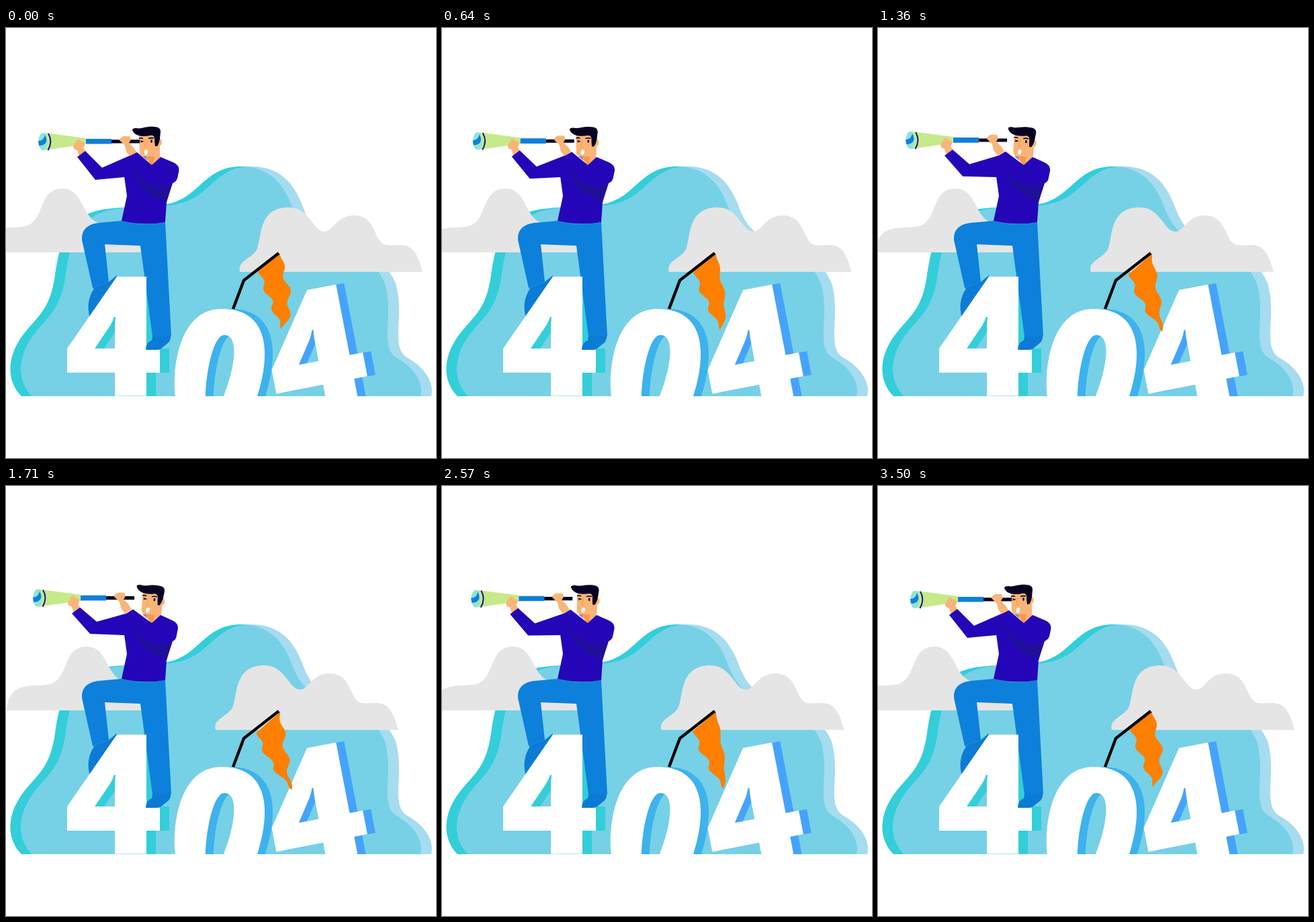
An HTML page with a canvas for the animation above (3570 ms loop, 640 by 640 pixels).

```html
<!DOCTYPE html>
<html lang="en">
<head>
<meta charset="utf-8">
<title>404</title>
<style>
  html, body { margin: 0; height: 100%; overflow: hidden; background: #fff; }
  canvas { display: block; }
</style>
</head>
<body>
<canvas id="stage" width="640" height="640"></canvas>
<script>
const ctx = document.getElementById('stage').getContext('2d');
const LOOP = 3570, STEPS = 50, GROUND = 548;
const C = {
  teal: '#33ced9', sky: '#76d1e6', pale: '#a6dcf0', cloud: '#e5e5e5',
  jeans: '#0d80db', shoe: '#0c7bd5', shirt: '#2406b8', shade: '#1f0f9b',
  skin: '#f9b577', neck: '#f9974d', hair: '#080124', flag: '#ff7f00',
  zero: '#3db2ec', four: '#45a3fb', lens: '#8be5dc', tube: '#c6ea89'
};

const shape = d => new Path2D(d);
const blob = shape('M23 548C0 525 0 487 29 452C52 425 66 415 73 368C80 325 86 280 145 270' +
  'C185 264 225 269 254 258C290 244 300 206 350 206C392 206 414 232 427 269' +
  'C455 345 535 310 564 380C578 430 555 475 582 491C608 506 622 528 617 548Z');
const leftCloud = shape('M-35 334C-32 285 10 302 32 294C58 284 48 239 84 239' +
  'C118 239 112 290 145 291C180 294 200 305 201 334Z');
const rightCloud = shape('M348 363C344 345 368 343 374 328C381 309 376 267 421 267C452 267 457 303 474 303' +
  'C487 303 491 279 518 279C552 279 547 320 566 323C588 326 607 310 620 363Z');

// The digit 4, measured from its top left corner
const four = shape('M0 0H44V107H64V143H44V177.5H-3V143H-74V107ZM-33 107H-3V73L-2 60H-4Q-7 68 -10 73Z');
const zero = shape('M252 548C247 505 258 418 321 418C395 418 393 490 374 548Z' +
  'M297 548C298 510 309 457 325 457C346 457 343 500 324 548Z');

const jeans = shape('M172 287L138 290C119 292 110 303 114 320L129 387L153 378L147 322L200 324' +
  'L218 459H246L237 289Q205 296 172 287Z');
const backShoe = shape('M129 387L153 378L165 368L160 400L125 432Q118 407 131 388Z');
const frontShoe = shape('M218 459H245Q245 465 242 468L231 477Q229 479 225 479H208Q208 468 217 465Z');
const hair = shape('M188 152Q188 149 194 149C201 151 208 146 220 147Q230 147 230 154L229 165' +
  'Q228 172 225 176H222Q221 170 221 164Q220 159 215 160C205 162 192 162 188 152Z');
const face = shape('M198 160H229V188Q229 191 225 191H205Q199 191 199 185Z');
const nearHand = shape('M100 176L105 167Q109 164 111 168L117 171Q118 175 115 178L118 183L109 192L106 182L101 180Z');
const farHand = shape('M168 166L174 161H184L186 166L183 171L190 178L195 186L185 192L179 184L177 175Z');

function fill(path, color) {
  ctx.fillStyle = color;
  ctx.fill(path, 'evenodd');
}

function line(d, color, width) {
  ctx.strokeStyle = color;
  ctx.lineWidth = width;
  ctx.stroke(shape(d));
}

function oval(x, y, rx, ry, color, turn = 0) {
  ctx.fillStyle = color;
  ctx.beginPath();
  ctx.ellipse(x, y, rx, ry, turn, 0, 7);
  ctx.fill();
}

// Runs a drawing moved by x,y and turned about that point
function place(x, y, paint, turn = 0) {
  ctx.save();
  ctx.translate(x, y);
  ctx.rotate(turn);
  paint();
  ctx.restore();
}

function poly(pts, color) {
  const path = new Path2D();
  pts.forEach(([x, y]) => path.lineTo(x, y));
  fill(path, color);
}

// Two copies of one outline, 16 apart, with their overlap in a third colour
function backdrop() {
  fill(blob, C.teal);
  place(16, 0, () => fill(blob, C.pale));
  ctx.save();
  ctx.clip(blob);
  place(16, 0, () => fill(blob, C.sky));
  ctx.restore();
}

function telescope() {
  poly([[57, 156], [119, 164], [119, 173], [57, 182]], C.tube);
  oval(55, 169, 6.7, 13, C.lens);
  fill(shape('M58 159Q61 165 60 169Q58 175 49 175L48 168Q56 168 58 159Z'), C.jeans);
  line('M63 157Q70 169 62.5 182', C.shade, 2);
  line('M119 168.8H157', C.jeans, 7.6);
  line('M157 168.9H199', C.hair, 5.2);
}

function head() {
  ctx.translate(-213, -208);
  oval(229, 170, 3, 5, C.skin);
  fill(face, C.skin);
  fill(hair, C.hair);
  line('M198 164.5Q201 163 204 164.5M212 164.5Q216 163 220 164', C.hair, 1.6);
  line('M200 167.5L204 169L200 170', C.hair, 1.1);
  oval(216.5, 168.5, 1.4, 2.4, C.hair);
  line('M208 166L206 177H209', C.neck, 1);
  oval(208.5, 185, 2.6, 4, '#fff', 0.15);
}

function man(p) {
  const dx = -8 * p, dy = -2.2 * p, neckX = -6 * p, lean = -1.5 * p;
  fill(jeans, C.jeans);
  poly([[203, 189], [229, 189], [229, 193], [217, 205]], C.skin);
  poly([[209, 191], [221, 191], [219, 203], [216, 204]], C.neck);
  poly([[203, 191], [209, 191], [210, 197]], '#9c82b5');
  place(213, 208, head, 0.115 * p);
  place(dx, dy, () => {
    telescope();
    fill(nearHand, C.skin);
    fill(farHand, C.skin);
  });
  poly([[118 + dx, 183 + dy], [143 + dx, 208 - 6 * p], [184 + neckX, 190], [190, 205],
    [176, 222], [133 + dx, 226 - 6 * p], [106 + dx, 192 + dy]], C.shirt);
  fill(shape(`M${183 + neckX} 191L${195 + neckX} ${185 + lean}L217 204L230 192L${249 + lean} 200` +
    `Q${258 + lean} 204 ${257.5 + lean} 212L${255 + lean} 224Q253 229 248 231` +
    'L239 259L237 289Q205 295 172 287L180 250L176 221Z'), C.shirt);
  fill(shape(`M${182 + 4 * p} ${194 + 12 * p}Q198 229 225 237L246 232L239 259Q212 250 197 229Z`), C.shade);
}

// Ribbon edge: a drifting line with a ripple that dies out at both ends
function flag(p) {
  const tau = 2 * Math.PI, rows = 40, right = [], left = [];
  const blend = (a, b) => a + (b - a) * p;
  const ripple = (s, a, b) => 4 * Math.pow(Math.sin(Math.PI * s), 0.4) *
    blend(Math.cos(2.9 * tau * (s - a)), Math.cos(2.9 * tau * (s - b)));
  for (let i = 0; i <= rows; i++) {
    const s = i / rows * 0.999, tip = blend(448, 452), top = blend(360, 367);
    right.push([408 + blend(26 * s - 24 * s ** 5, 17 * s) + ripple(s, 0.14, 0.27), 336 + (tip - 336) * s]);
    left.unshift([blend(375 + 35 * s, 373 + 52 * s - 6 * Math.sin(Math.PI * s)) + ripple(s, 0.17, 0.16),
      top + (tip - top) * s]);
  }
  poly([...right, ...left], C.flag);
}

function draw(p) {
  const drift = 36.3 * p, tilt = -0.19;
  ctx.fillStyle = '#fff';
  ctx.fillRect(0, 0, 640, 640);
  ctx.save();
  ctx.beginPath();
  ctx.rect(0, 0, 640, GROUND);
  ctx.clip();
  backdrop();
  place(drift, 0, () => fill(leftCloud, C.cloud));
  place(-drift, 0, () => fill(rightCloud, C.cloud));

  place(179, 370, () => fill(four, C.teal));
  fill(backShoe, C.shoe);
  man(p);
  place(165, 370, () => fill(four, '#fff'));
  fill(frontShoe, C.shoe);

  place(12, 0, () => fill(zero, C.zero));
  fill(zero, '#fff');
  place(460, 388, () => fill(four, C.four), tilt);
  place(448, 390, () => fill(four, '#fff'), tilt);

  flag(p);
  line('M338 418L354 375.5L406 335', '#000', 4.4);
  ctx.restore();
}

function tick() {
  const t = performance.now() % LOOP;
  const step = Math.floor((t + 5) / (LOOP / STEPS)) % STEPS;
  draw((1 - Math.cos(2 * Math.PI * step / STEPS)) / 2);
  requestAnimationFrame(tick);
}
tick();
</script>
</body>
</html>
```
